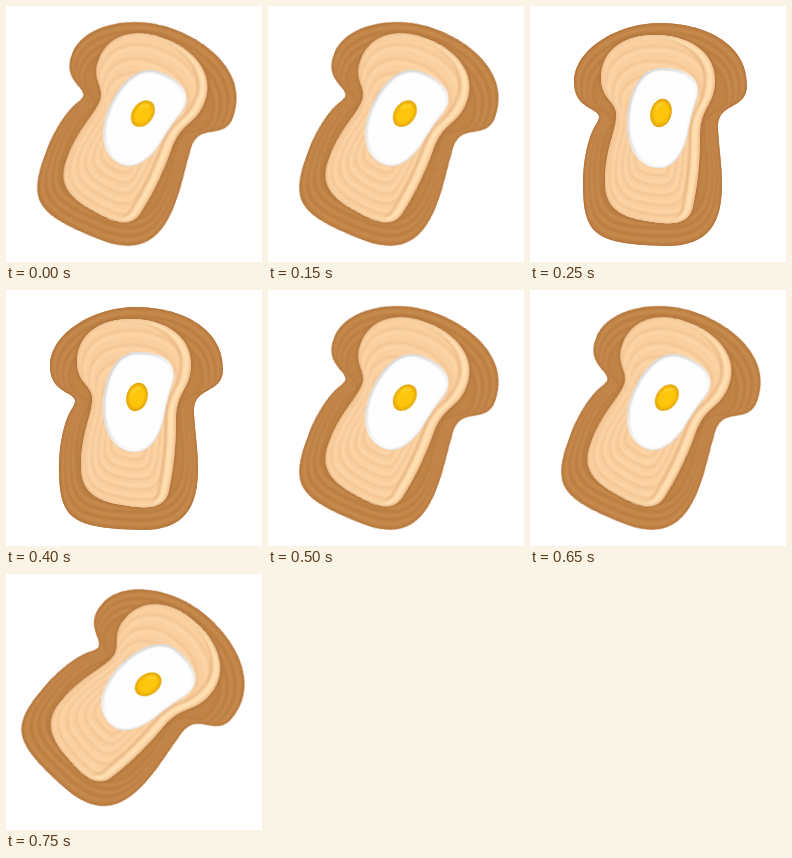
An HTML page for the animation above (1000 ms loop, 256 by 256 pixels).

```html
<!DOCTYPE html>
<html lang="en">
<head>
<meta charset="utf-8">
<title>Egg on toast</title>
<style>
html, body { margin: 0; width: 100%; height: 100%; overflow: hidden; background: #fff; }
svg { display: block; width: 100vw; height: 100vh; }
.soft { filter: url(#soft); }
#toast {
  transform-origin: 132px 124px;
  animation: rock 1s step-end infinite;
}
@keyframes rock {
  0%, 50%, 100% { transform: rotate(20deg); }
  25% { transform: rotate(0deg); }
  75% { transform: rotate(40deg); }
}
</style>
</head>
<body>
<svg viewBox="0 0 256 256">
  <defs>
    <path id="crust" d="M44 76C44 43 88 17 130 17S217 36 217 79C217 106 186 94 188 124C189 142 192 160 192 178C192 216 180 240 136 240C66 238 53 230 53 178C53 152 59 128 67 117C78 100 44 108 44 76Z"/>
    <path id="spread" d="M71 72C71 44 94 29 125 29S185 44 185 74C185 100 170 100 170 130S167 182 163 200C160 217 145 218 132 217C94 213 75 206 75 176C75 140 88 122 86 106C84 94 71 92 71 72Z"/>
    <path id="egg" d="M132 62C156 62 172 72 167 92C162 106 160 116 158 126C154 148 143 162 130 162C108 162 98 142 97 120C97 90 108 62 132 62Z"/>
    <clipPath id="crustClip"><use href="#crust"/></clipPath>
    <clipPath id="spreadClip"><use href="#spread"/></clipPath>
    <clipPath id="eggClip"><use href="#egg"/></clipPath>
    <filter id="soft" x="-10%" y="-10%" width="120%" height="120%"><feGaussianBlur stdDeviation="1.2"/></filter>
    <radialGradient id="yolk">
      <stop offset=".6" stop-color="#fdc60c"/>
      <stop offset=".8" stop-color="#f4b808"/>
      <stop offset="1" stop-color="#dc9f04"/>
    </radialGradient>
  </defs>
  <g id="toast">
    <use href="#crust" fill="#c08446"/>
    <g clip-path="url(#crustClip)" fill="none">
      <g id="crustRings" class="soft"></g>
      <use href="#crust" stroke="#b3743a" stroke-width="3" class="soft"/>
      <use href="#spread" stroke="#b2763c" stroke-width="4" class="soft"/>
    </g>
    <use href="#spread" fill="#fbd0a0"/>
    <g clip-path="url(#spreadClip)" fill="none">
      <g id="spreadRings" class="soft"></g>
      <use href="#spread" stroke="#e3b27c" stroke-width="2" transform="translate(-10 1)" class="soft"/>
      <use href="#spread" stroke="#ffe0b2" stroke-width="5" transform="translate(-5 0)" class="soft"/>
      <use href="#spread" stroke="#e9b98a" stroke-width="2" class="soft"/>
    </g>
    <use href="#egg" fill="#fefefe"/>
    <g clip-path="url(#eggClip)" fill="none">
      <use href="#egg" stroke="#bdbdbd" stroke-width="3" class="soft"/>
      <use href="#egg" stroke="#fff" stroke-width="3" transform="translate(-1.5 -1.5)" class="soft"/>
    </g>
    <g transform="translate(131 107) rotate(15)">
      <ellipse rx="10.5" ry="14.5" fill="url(#yolk)"/>
      <path d="M-6 -2Q-5 -9 1 -10" fill="none" stroke="#ffd83a" stroke-width="2" class="soft"/>
    </g>
  </g>
</svg>
<script>
const NS = "http://www.w3.org/2000/svg";

// Adds one brush line: a shape's outline shrunk towards a point.
function ring(shape, scale, cx, cy, colour, width) {
  const use = document.createElementNS(NS, "use");
  const attrs = {
    href: "#" + shape,
    transform: `translate(${cx} ${cy}) scale(${scale}) translate(${-cx} ${-cy})`,
    stroke: colour,
    "stroke-width": width / scale
  };
  for (const key in attrs) use.setAttribute(key, attrs[key]);
  document.getElementById(shape + "Rings").append(use);
}

for (let s = 0.95; s > 0.8; s -= 0.07) {
  ring("crust", s, 128, 126, "#c78b4e", 3);
  ring("crust", s - 0.035, 128, 126, "#b87b40", 2);
}
for (let s = 0.9; s > 0.2; s -= 0.13) {
  ring("spread", s, 124, 140, "#efc18f", 1.8);
  ring("spread", s - 0.04, 124, 140, "#ffd8ab", 2);
}
</script>
</body>
</html>
```
